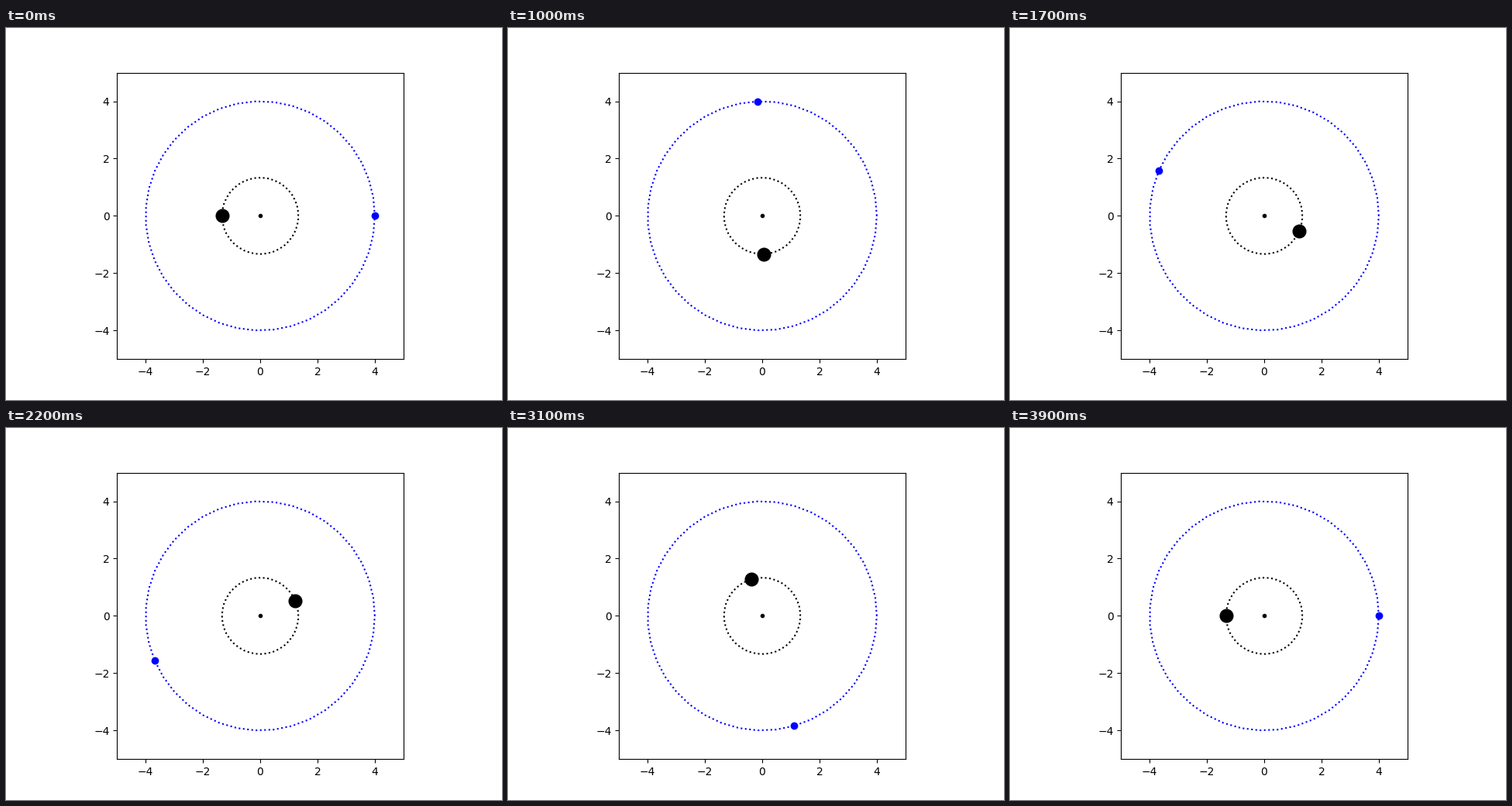
A matplotlib script that plays this animation: 640x480 px, repeating every 4000 ms.

```python
import numpy as np
import matplotlib.pyplot as plt
from matplotlib.animation import FuncAnimation

FRAMES = 40
INTERVAL = 100
R_LIGHT = 4.0
MASS_RATIO = 3.0

# Two bodies circling their common centre of mass, always opposite each other
theta = np.linspace(0, 2 * np.pi, FRAMES)
light = R_LIGHT * np.array([np.cos(theta), np.sin(theta)])
heavy = -light / MASS_RATIO

fig, ax = plt.subplots(figsize=(6.4, 4.8), dpi=100)
ax.set_aspect("equal")
ax.set_xlim(-5, 5)
ax.set_ylim(-5, 5)
ticks = range(-4, 5, 2)
ax.set_xticks(ticks)
ax.set_yticks(ticks)

ax.plot(*light, "b:", lw=1.5)
ax.plot(*heavy, "k:", lw=1.5)
ax.plot(0, 0, "k.", ms=6)
light_dot, = ax.plot([], [], "bo", ms=6)
heavy_dot, = ax.plot([], [], "ko", ms=12)


def update(i):
    light_dot.set_data(light[:, i:i + 1])
    heavy_dot.set_data(heavy[:, i:i + 1])
    return light_dot, heavy_dot


anim = FuncAnimation(fig, update, frames=FRAMES, interval=INTERVAL,
                     repeat=True, repeat_delay=0)
plt.show()
```
